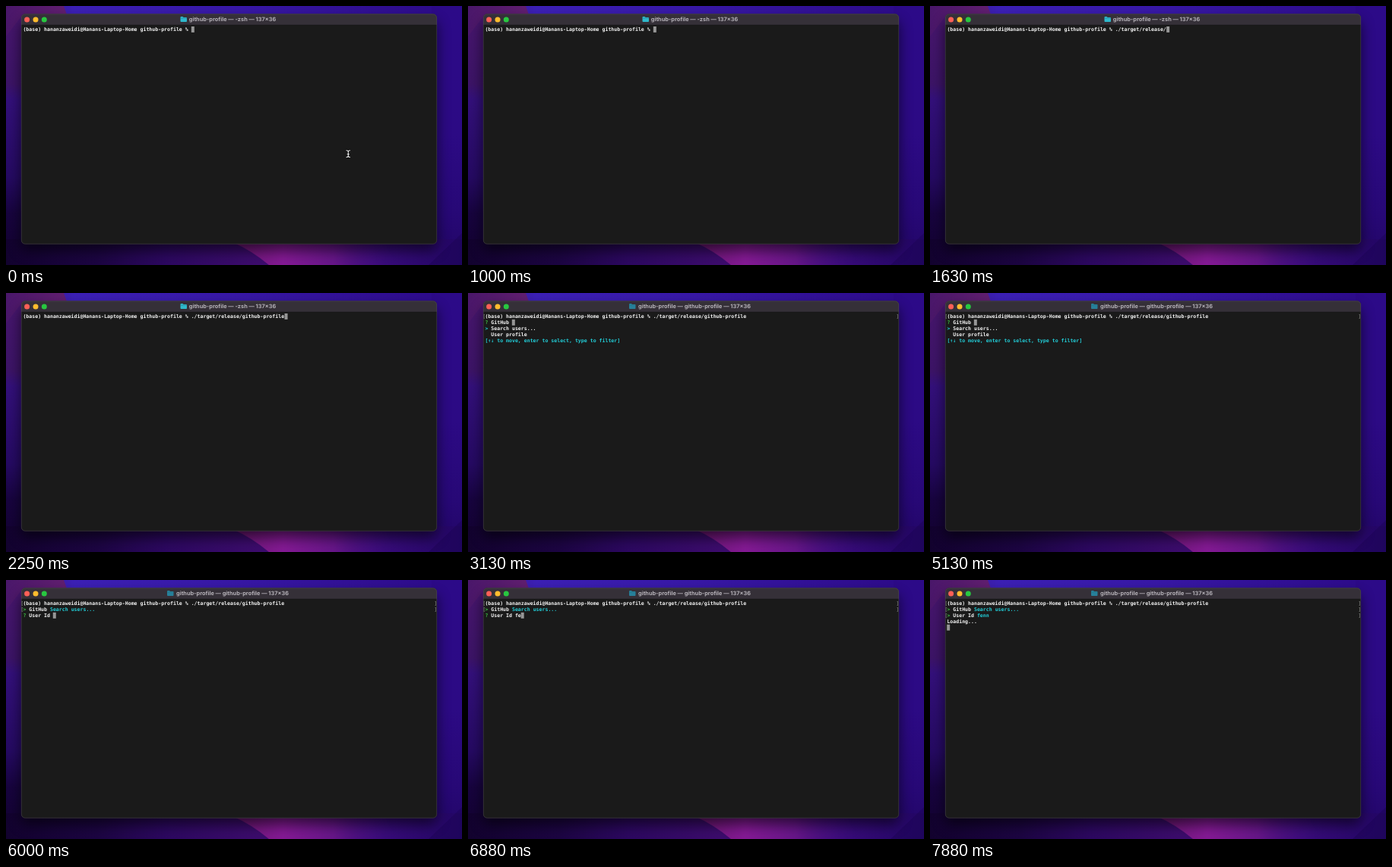
Animation, 600 px wide and 342 px high, one loop 8 s. Source, as an HTML page:

```html
<!DOCTYPE html>
<html lang="en">
<head>
<meta charset="utf-8">
<title>Terminal session</title>
<style>
  html, body { margin: 0; width: 100%; height: 100%; overflow: hidden; background: #24086a; }
  svg { display: block; width: 600px; height: 342px; }
  text { white-space: pre; text-rendering: geometricPrecision; }
  #screen text { font: bold 6.575px "DejaVu Sans Mono", "Noto Sans Mono", monospace; }
  #title { font: 700 7.35px Inter, Roboto, sans-serif; fill: #b5b1b8; text-anchor: middle; }
  #screen .mark { font-weight: normal; }
</style>
</head>
<body>
<svg viewBox="0 0 600 342">
  <defs>
    <linearGradient id="sky" x1="0" x2="1" y1="0" y2="0">
      <stop offset="0" stop-color="#3a1478"/>
      <stop offset=".15" stop-color="#3c20b6"/>
      <stop offset=".5" stop-color="#3818a6"/>
      <stop offset="1" stop-color="#2c0a88"/>
    </linearGradient>
    <linearGradient id="left" x1="0" x2="0" y1="0" y2="1">
      <stop offset="0" stop-color="#48166e"/>
      <stop offset=".3" stop-color="#3c1466"/>
      <stop offset=".36" stop-color="#33107a"/>
      <stop offset=".66" stop-color="#250a62"/>
      <stop offset=".8" stop-color="#17043e"/>
      <stop offset="1" stop-color="#12022e"/>
    </linearGradient>
    <linearGradient id="right" x1="0" x2="0" y1="0" y2="1">
      <stop offset="0" stop-color="#2c0a88"/>
      <stop offset=".5" stop-color="#2c0a84"/>
      <stop offset=".8" stop-color="#270876"/>
      <stop offset="1" stop-color="#220664"/>
    </linearGradient>
    <linearGradient id="floor" x1="0" x2="1" y1="0" y2="0">
      <stop offset="0" stop-color="#12022e"/>
      <stop offset=".2" stop-color="#1c0542"/>
      <stop offset=".35" stop-color="#2c0860"/>
      <stop offset=".55" stop-color="#3c0c6c"/>
      <stop offset=".8" stop-color="#3a0c7c"/>
      <stop offset="1" stop-color="#220664"/>
    </linearGradient>
    <linearGradient id="glow" x1="0" x2="1" y1="0" y2="0">
      <stop offset="0" stop-color="#6a1670"/>
      <stop offset=".3" stop-color="#841a94"/>
      <stop offset=".6" stop-color="#661688"/>
      <stop offset="1" stop-color="#350b78" stop-opacity="0"/>
    </linearGradient>
    <linearGradient id="rose" x1="0" x2="1" y1="0" y2="0">
      <stop offset="0" stop-color="#4a176a"/>
      <stop offset="1" stop-color="#621f70"/>
    </linearGradient>
    <filter id="soft" x="-15%" y="-20%" width="130%" height="140%">
      <feGaussianBlur stdDeviation="9"/>
    </filter>
    <clipPath id="frame"><rect x="20" y="10.5" width="547" height="304" rx="5"/></clipPath>
  </defs>

  <rect width="600" height="342" fill="url(#sky)"/>
  <rect width="24" height="342" fill="url(#left)"/>
  <rect x="560" width="40" height="342" fill="url(#right)"/>
  <path d="M0 0H76L81 14H20L0 40Z" fill="url(#rose)"/>
  <rect y="308" width="600" height="34" fill="url(#floor)"/>
  <path d="M298 312Q322 322 346 342H520Q500 326 500 312Z" fill="url(#glow)"/>
  <path d="M556 342L600 300V342Z" fill="#1b0450" opacity=".4"/>
  <rect x="20" y="20" width="547" height="303" rx="6" opacity=".6" filter="url(#soft)"/>

  <g clip-path="url(#frame)">
    <rect x="20" y="10" width="547" height="305" fill="#1a1a1a"/>
    <rect x="20" y="10" width="547" height="15" fill="#353038"/>
    <rect x="20" y="24.8" width="547" height=".5" fill="#151515"/>
  </g>
  <rect x="20.3" y="10.8" width="546.4" height="303.4" rx="5" fill="none" stroke="#5b5660" stroke-width=".6" opacity=".7"/>
  <circle cx="27.6" cy="18" r="3.5" fill="#ff5f57"/>
  <circle cx="39" cy="18" r="3.5" fill="#febc2e"/>
  <circle cx="50.3" cy="18" r="3.5" fill="#28c840"/>

  <g id="folder">
    <path d="M0 1Q0 0 1 0H3L4 1H7.6Q8.5 1 8.5 2V6.2Q8.5 7 7.6 7H1Q0 7 0 6Z"/>
    <path d="M0 2.1H8.5" stroke="#1c6f80" stroke-width=".5"/>
  </g>
  <text id="title" x="298" y="20.4"></text>
  <g id="screen"></g>
  <g id="pointer" fill="none" stroke-linecap="round">
    <path id="beam" d="M447.8 190.8Q450.3 190.8 450.3 192.5V198Q450.3 199.7 447.8 199.7M452.8 190.8Q450.3 190.8 450.3 192.5M450.3 198Q450.3 199.7 452.8 199.7M449 195.8H451.6" stroke-width="2.4" stroke="#000"/>
    <path d="M447.8 190.8Q450.3 190.8 450.3 192.5V198Q450.3 199.7 447.8 199.7M452.8 190.8Q450.3 190.8 450.3 192.5M450.3 198Q450.3 199.7 452.8 199.7M449 195.8H451.6" stroke-width="1.1" stroke="#f2f2f2"/>
  </g>
</svg>

<script>
const LOOP = 8000, LEFT = 22.4, COL = 3.958, ROW = 7.94, BASE = 33.3;
const WHITE = "#f2f2f2", CYAN = "#22ccd6", GREEN = "#3cba42", GRAY = "#8c8c8c";
const $ = id => document.getElementById(id);

const PROMPT = "(base) hananzaweidi@Hanans-Laptop-Home github-profile % ";
const COMMAND = "./target/release/github-profile";
const NAME = "fenn";

// [start time, visible length]
const commandSteps = [[0, 0], [1130, 3], [1250, 9], [1630, 17], [1880, 31]];
const nameSteps = [[0, 0], [6630, 1], [6880, 2], [7000, 3], [7130, 4]];
const POINTER_OFF = 500, RUN = 3000, CHOOSE = 5750, ENTER = 7500;

const valueAt = (steps, t) => steps.filter(s => s[0] <= t).pop()[1];
const span = (text, fill = WHITE) => ({ text, fill });

// Each line is a list of coloured spans; the cursor sits on a column and row.
function scene(t) {
  const typed = COMMAND.slice(0, valueAt(commandSteps, t));
  const lines = [[span(PROMPT + typed)]];
  if (t < RUN) return { lines, marks: 0, col: (PROMPT + typed).length, row: 0 };

  if (t < CHOOSE) {
    lines.push(
      [span("? ", GREEN), span("GitHub ")],
      [span("> ", CYAN), span("Search users...")],
      [span("  User profile")],
      [span("[↑↓ to move, enter to select, type to filter]", CYAN)]
    );
    return { lines, marks: 1, col: 9, row: 1 };
  }

  lines.push([span("> ", GREEN), span("GitHub "), span("Search users...", CYAN)]);
  if (t < ENTER) {
    const name = NAME.slice(0, valueAt(nameSteps, t));
    lines.push([span("? ", GREEN), span("User Id " + name)]);
    return { lines, marks: 2, col: 10 + name.length, row: 2 };
  }

  lines.push([span("> ", GREEN), span("User Id "), span(NAME, CYAN)], [span("Loading...")]);
  return { lines, marks: 3, col: 0, row: 4 };
}

function add(parent, tag, attrs, text = "") {
  const node = document.createElementNS("http://www.w3.org/2000/svg", tag);
  for (const key in attrs) node.setAttribute(key, attrs[key]);
  node.textContent = text;
  return parent.appendChild(node);
}

function drawScreen({ lines, marks, col, row }) {
  const screen = $("screen");
  screen.replaceChildren();
  add(screen, "rect", {
    x: LEFT + col * COL - 0.2, y: 27 + row * ROW, width: 4, height: 7.9, fill: "#969696"
  });
  lines.forEach((spans, i) => {
    const y = BASE + i * ROW;
    const line = add(screen, "text", { x: LEFT, y });
    spans.forEach(s => add(line, "tspan", { fill: s.fill }, s.text));
    if (i < marks) {
      add(screen, "text", { x: 19.2, y, fill: GRAY, class: "mark" }, "[");
      add(screen, "text", { x: 563.3, y, fill: GRAY, class: "mark" }, "]");
    }
  });
}

function drawTitle(running) {
  $("title").textContent = `github-profile — ${running ? "github-profile" : "-zsh"} — 137×36`;
  $("folder").setAttribute("transform", `translate(${running ? 212 : 229.5} 14)`);
  $("folder").setAttribute("fill", running ? "#27809a" : "#2fb9cc");
}

const start = performance.now();
let last = "";

function render(now) {
  const t = Math.max(0, now - start) % LOOP;
  const state = scene(t);
  $("pointer").style.display = t < POINTER_OFF ? "" : "none";

  const key = JSON.stringify(state);
  if (key !== last) {
    last = key;
    drawScreen(state);
    drawTitle(t >= RUN);
  }
  requestAnimationFrame(render);
}
requestAnimationFrame(render);
</script>
</body>
</html>
```
